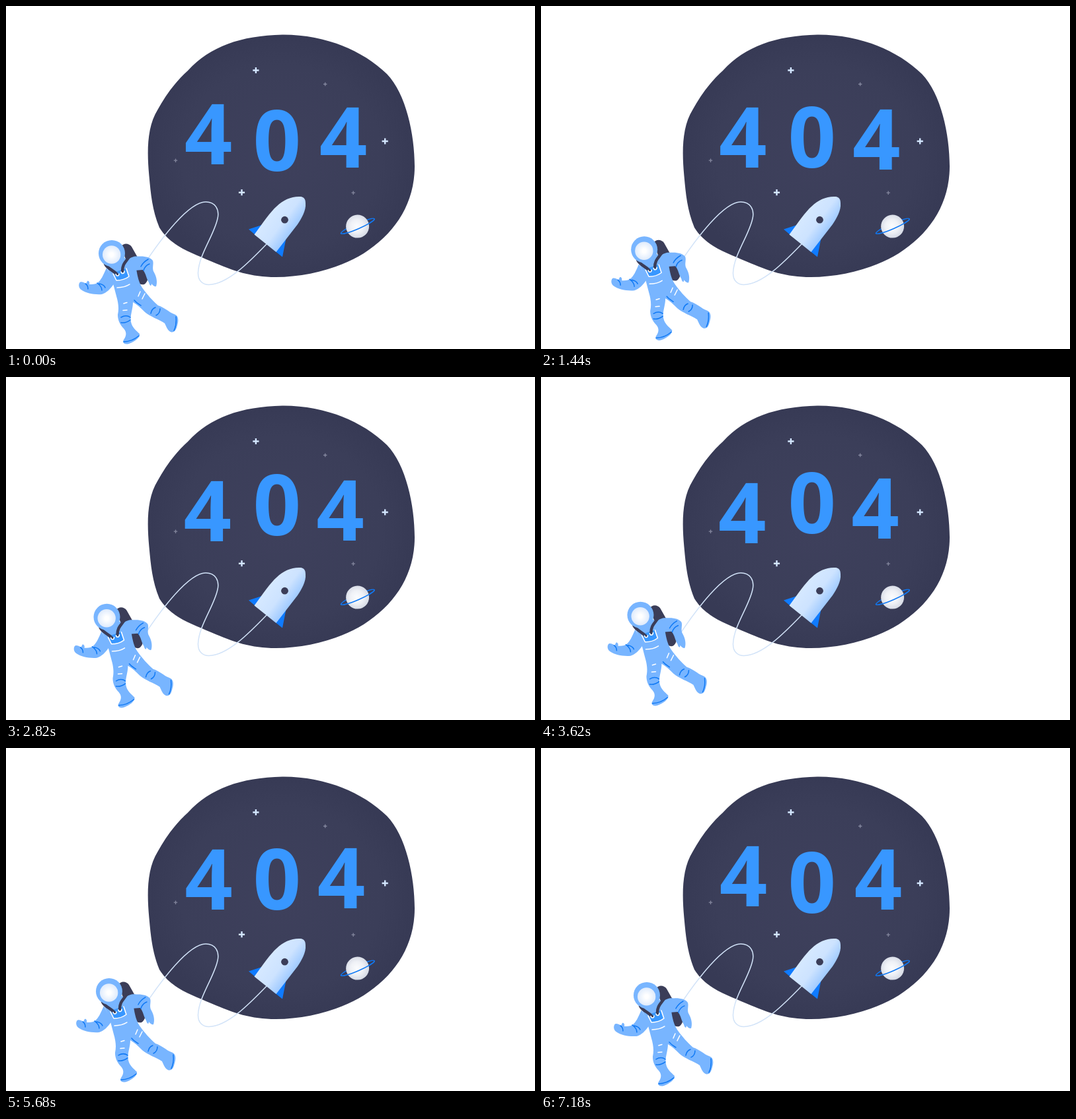
An HTML page that plays this animation: 800 by 520 pixels, repeating every 7200 ms.

```html
<!DOCTYPE html>
<html lang="en">
<head>
<meta charset="utf-8">
<title>404</title>
<style>
  html, body { margin: 0; width: 100%; height: 100%; overflow: hidden; background: #fff; }
  svg { display: block; width: 800px; height: 520px; }
  text { font: 700 127px "Open Sans", "Noto Sans", sans-serif; fill: #3897ff; }
  .line { fill: none; stroke-linecap: round; stroke-linejoin: round; stroke-width: 1.5; }
  .suit { fill: #78b5ff; }
  .dark { fill: #3b3d58; }
  .blue { stroke: #0f79f5; }
  .white { stroke: #fff; }
</style>
</head>
<body>
<svg viewBox="0 0 800 520">
  <defs>
    <radialGradient id="space">
      <stop offset="0" stop-color="#3e405c"/>
      <stop offset=".75" stop-color="#3b3e59"/>
      <stop offset="1" stop-color="#373a55"/>
    </radialGradient>
    <linearGradient id="hull" gradientUnits="userSpaceOnUse" x1="390" y1="324" x2="430" y2="354">
      <stop offset="0" stop-color="#d6e9ff"/>
      <stop offset=".5" stop-color="#cde3ff"/>
      <stop offset="1" stop-color="#94c4ff"/>
    </linearGradient>
    <radialGradient id="moon" cx=".48" cy=".48" r=".56">
      <stop offset="0" stop-color="#fbfcfe"/>
      <stop offset=".5" stop-color="#eff1f6"/>
      <stop offset="1" stop-color="#d2d7e3"/>
    </radialGradient>
    <radialGradient id="visor">
      <stop offset=".2" stop-color="#fff"/>
      <stop offset="1" stop-color="#dfebfc"/>
    </radialGradient>
  </defs>

  <path fill="url(#space)" d="M418 43.500C480 43 538 66 576 103C605 133 618 195 618 243C618 300 588 345 541 375C506 397 455 411 408 411C370 411 345 402 310 387C281 374 250 365 232 336C221 309 219 285 216.500 258C213.500 225 212 185 229.500 157C240 138 255 116 275 98C309 61 355 45 418 43.500Z"/>

  <path stroke="#d4e7ff" stroke-width="2.4" d="M373.3 97.5h9.2m-4.6-4.6v9.2M568.6 205h9.2m-4.6-4.6v9.2M351.9 282.7h9.2m-4.6-4.6v9.2"/>
  <path stroke="#85889f" stroke-width="1.3" d="M480 118.5h5.4m-2.7-2.7v5.4M253.8 234.2h5.4m-2.7-2.7v5.4M522.5 283.2h5.4m-2.7-2.7v5.4"/>

  <text id="left" x="269.7" y="239.7">4</text>
  <text id="zero" x="373.5" y="250.4">0</text>
  <text id="right" x="473.8" y="245.4">4</text>

  <path class="line" stroke="#d2e3f8" d="M206 396C236 350 277 297 302 297C317 297 323 309 320 322C315 347 292 376 290.500 404C290 416 297 422.500 307 422.500C335 422 368 388 394 361"/>

  <g>
    <path fill="#0f7bff" d="M367 338.500L393 330L377 347ZM424 350L418 380.500L405 370Z"/>
    <path fill="url(#hull)" d="M375.500 346.500C389 328 400 312 409 304C420 293 433 288 446 289C451 290 453 293 453 299C454 310 447 322 441 331L408.500 373Z"/>
    <circle class="dark" cx="421.500" cy="324.200" r="5.400"/>
  </g>

  <g transform="rotate(-23.500 531.800 333.800)">
    <ellipse class="line blue" cx="531.800" cy="333.800" rx="27.500" ry="4"/>
    <circle cx="531.500" cy="334" r="17.500" fill="url(#moon)"/>
    <path class="line blue" d="M504.300 333.800A27.500 4 0 0 0 559.300 333.800"/>
  </g>

  <g id="astronaut">
    <path class="dark" d="M174 365C177 359 186 359 190 365L213 406C216 412 214 419 209 422C202 424 196 417 190 408Z"/>

    <!-- left arm, then torso with legs, then right arm -->
    <path class="suit" d="M152 397C147 408 144 416 138 420C134 422 130 422 126 422C127 419 125 416 123 417L121 421C117 418 112 417 111 420C109 424 111 429 115 431C121 435 133 438 145 437C152 435 158 429 164 420Z"/>
    <path class="suit" d="M149 388L180 382L197 398C199 411 201 419 206 427C213 437 222 447 230 454C240 457 246 464 254 467C260 469 261 474 260 480C258 488 257 495 250 494.500C244 492 243 487 240 481C231 475 218 471 210 464C204 458 199 453 192 449C192 460 187 470 189 479C191 488 197 492 202 497C203 503 194 509 186 512C180 514 175 511 178 506C182 500 183 495 178 489C172 483 169 476 169 468C171 459 170 450 167 440C164 429 162 419 158 410Z"/>
    <path class="suit" d="M181 388C188 380 194 379 201 379.500C210 379 219 381 222 386C224 391 220 398 224 404C228 411 229 419 227 425C224 426 222 423 220 421C220 426 217 424 216 419C212 413 212 406 207 400L194 401Z"/>

    <path fill="#3897ff" d="M163 404L181 398L185 410C178 415 172 416 167 415Z"/>
    <path class="line white" d="M162 406L167 416C174 416 181 414 186 410L182 398M168 427C175 427 181 426 187 422M178 451L183 449.500M177 461.500L183 461M203 433L200 440M210 436L206 444"/>
    <path class="line blue" d="M141 421C146 422 149 424 150 427M138 420C142 423 145 427 145 431M120 421C123 423 124 427 124 429M215 384C208 388 206 391 204 395M217 391C212 393 209 397 208 401M174 472C179 469 184 469 188 472M174 480C179 481 184 479 188 476M219 466C220 461 223 458 226 457M227 469C231 467 233 464 233 459M194 446C197 450 201 452 204 454M178 509C187 509 195 505 201 500M254 492C257 486 258 480 257 471"/>

    <path class="line" stroke="#3b3d58" style="stroke-width:4.5" d="M150 391C154 399 162 400 168 407M188 377C183 387 176 389 176 402"/>
    <circle class="suit" cx="160" cy="375" r="20"/>
    <circle cx="159.700" cy="377" r="13.700" fill="url(#visor)"/>
    <path class="line white" d="M166 406.500C167 410 171 410 171 406M174 403C175 407 179 406 179 402"/>
  </g>
</svg>
<script>
  const LOOP = 7200;
  // Waypoints: [fraction of the loop, x, y]
  const paths = {
    left: [[0, 0, 0], [.5, -1.6, 12.4], [.78, .7, 5.5], [1, 0, 0]],
    zero: [[0, 0, 0], [.5, 0, -13], [1, 0, 0]],
    right: [[0, 0, 0], [1 / 3, -4.5, 3.6], [2 / 3, -4.7, -3.3], [1, 0, 0]],
    astronaut: [[0, 0, 0], [.5, -9.6, -14.3], [1, 0, 0]]
  };

  function place(points, p) {
    const i = points.findIndex(point => point[0] > p);
    const [p0, x0, y0] = points[i - 1], [p1, x1, y1] = points[i];
    const k = (p - p0) / (p1 - p0);
    return `translate(${x0 + (x1 - x0) * k} ${y0 + (y1 - y0) * k})`;
  }

  function draw() {
    const p = performance.now() % LOOP / LOOP;
    for (const id in paths)
      document.getElementById(id).setAttribute("transform", place(paths[id], p));
    requestAnimationFrame(draw);
  }
  draw();
</script>
</body>
</html>
```
